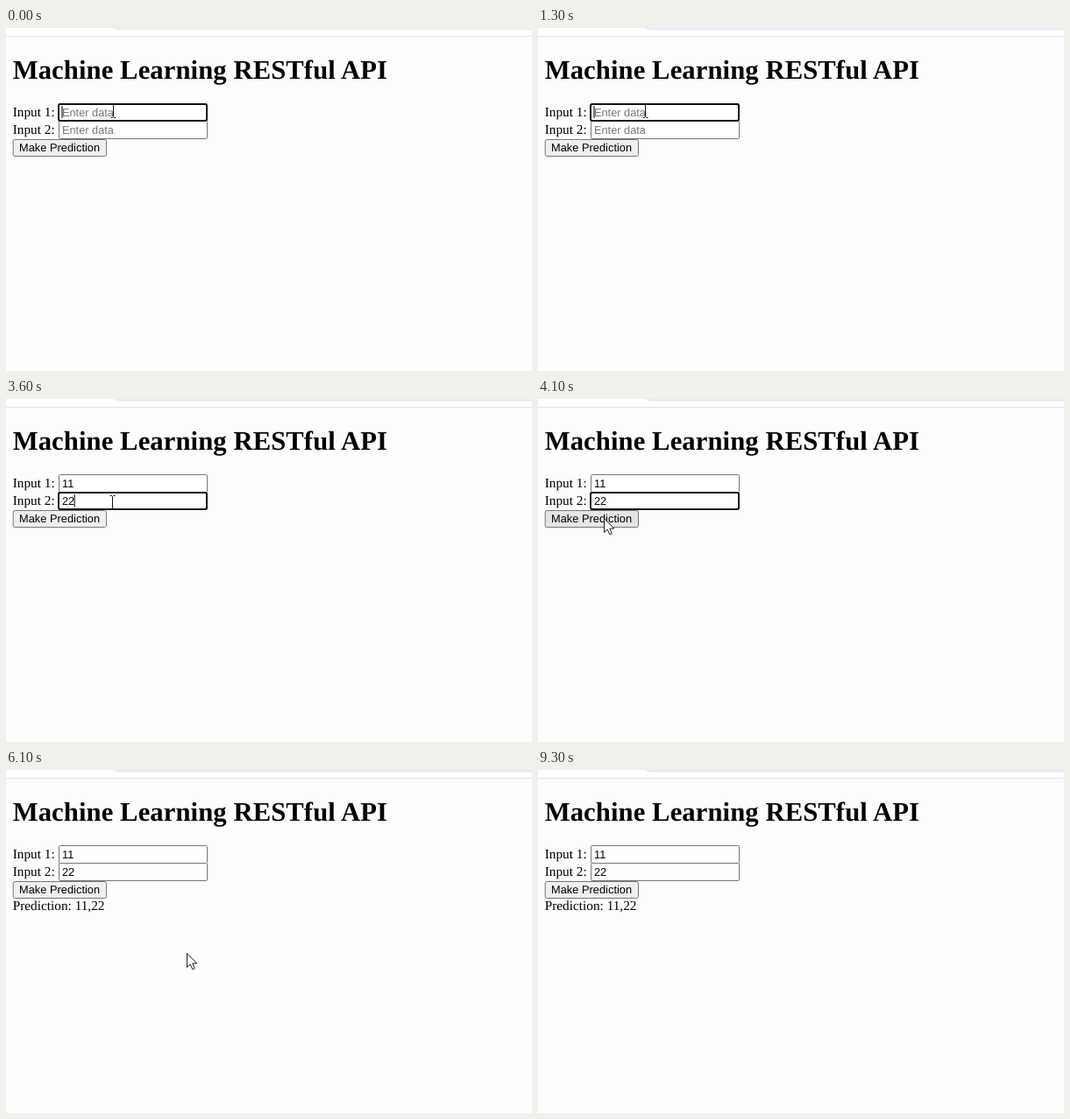
An HTML page that plays this animation: 600 px wide and 392 px high, repeating every 9500 ms.

```html
<!DOCTYPE html>
<html lang="en">
<head>
<meta charset="utf-8">
<title>Machine Learning RESTful API</title>
<style>
  html, body { margin: 0; width: 100%; height: 100%; overflow: hidden; background: #fefdfe; }
  svg { display: block; width: 600px; height: 392px; }
  text { font: 15.3px "Liberation Serif", serif; white-space: pre; text-rendering: geometricPrecision; }
  .heading { font-size: 30.65px; font-weight: bold; letter-spacing: .09px; }
  .control { font: 12.77px "Liberation Sans", sans-serif; }
</style>
</head>
<body>
<svg viewBox="0 0 600 392">
  <rect width="600" height="9" fill="#fff"/>
  <path id="bar" d="M122 0H600V2.5H130Q125 2.5 122 0Z"/>
  <rect y="9" width="600" height="1" fill="#e2e2ea"/>
  <text class="heading" x="7.7" y="58">Machine Learning RESTful API</text>
  <text x="7.7" y="101">Input 1:</text>
  <text x="7.7" y="121">Input 2:</text>
  <g id="fields"></g>
  <rect id="button" x="8.2" y="127.5" width="106.3" height="19" rx="2" stroke="#767676"/>
  <text class="control" x="15" y="141" letter-spacing=".04">Make Prediction</text>
  <text id="result" x="7.7" y="160">Prediction: 11,22</text>
  <path id="beam" d="M-3 -7.5H-1L0 -6.5L1 -7.5H3M0 -6.5V6.5M-3 7.5H-1L0 6.5L1 7.5H3" fill="none" stroke="#111"/>
  <path id="arrow" d="M0 0V16L3.7 12.6L6.3 18.3L8.8 17.2L6.3 11.6H11.3Z" fill="#fff" stroke="#111" stroke-width=".95"/>
</svg>
<script>
const LOOP = 9500, STEP = 100;
const $ = id => document.getElementById(id);
const show = (node, on) => node.setAttribute("visibility", on ? "visible" : "hidden");

function add(parent, tag, attributes) {
  const node = document.createElementNS("http://www.w3.org/2000/svg", tag);
  for (const [key, value] of Object.entries(attributes)) node.setAttribute(key, value);
  return parent.appendChild(node);
}

function makeField(top, focusStart, focusEnd, typing, blinks) {
  const group = add($("fields"), "g", {});
  return {
    group, focusStart, focusEnd, typing, blinks,
    box: add(group, "rect", { x: 60.5, y: top - .5, width: 169, height: 20, rx: 1, fill: "#fff", stroke: "#767676" }),
    ring: add(group, "rect", { x: 60, y: top, width: 169, height: 19, rx: 2, fill: "#fff", stroke: "#101010", "stroke-width": 2 }),
    text: add(group, "text", { class: "control", x: 64, y: top + 14 }),
    caret: add(group, "rect", { y: top + 2, width: 1, height: 14, fill: "#000" })
  };
}

// Each blink time toggles the caret, which is on when the field gets focus.
const fields = [
  makeField(87, 0, 1900, [[1400, "1"], [1500, "11"]], [500, 1000]),
  makeField(107, 1900, 5400, [[3400, "2"], [3600, "22"]], [2500, 3000, 4100, 4700, 5200])
];

// time, x, y of the pointer
const path = [
  [0, 122, 95], [1500, 122, 95], [1700, 121, 118], [3600, 121, 118],
  [4100, 75, 137], [5600, 75, 137], [6600, 336, 283], [6700, 259, 374], [LOOP, 259, 374]
];

function pointerAt(t) {
  const i = path.findIndex(point => point[0] > t);
  const [t0, x0, y0] = path[i - 1], [t1, x1, y1] = path[i];
  const u = (t - t0) / (t1 - t0), eased = u * u * (3 - 2 * u);
  return [x0 + (x1 - x0) * eased, y0 + (y1 - y0) * eased];
}

function drawField(field, t) {
  const focused = t >= field.focusStart && t < field.focusEnd;
  const value = field.typing.reduce((last, [time, text]) => t >= time ? text : last, "");
  const toggles = field.blinks.filter(time => t >= time).length;
  show(field.ring, focused);
  show(field.caret, focused && toggles % 2 === 0);
  field.caret.setAttribute("x", 63.5 + value.length * 7.1);
  field.text.textContent = value || "Enter data";
  field.text.setAttribute("fill", value ? "#000" : "#757575");
  if (focused && field.group.nextSibling) $("fields").append(field.group);
}

function draw(t) {
  fields.forEach(field => drawField(field, t));
  const [x, y] = pointerAt(t);
  const isArrow = y >= 127;
  const hovered = isArrow && y < 147 && x < 115;
  const pressed = t >= 5400 && t < 5500;
  $("bar").setAttribute("fill", t < 100 ? "#ededed" : "#e9eaf4");
  $("button").setAttribute("fill", pressed ? "#f5f5f5" : hovered ? "#e5e5e5" : "#efefef");
  show($("result"), t >= 5500);
  show($("beam"), !isArrow);
  show($("arrow"), isArrow && t < 6800);
  $("beam").setAttribute("transform", `translate(${Math.round(x) + .5} ${Math.round(y)})`);
  $("arrow").setAttribute("transform", `translate(${Math.round(x) + .5} ${Math.round(y) - .5})`);
}

function tick() {
  const t = performance.now() % LOOP;
  draw(Math.floor(t / STEP) * STEP);
  requestAnimationFrame(tick);
}
tick();
</script>
</body>
</html>
```
